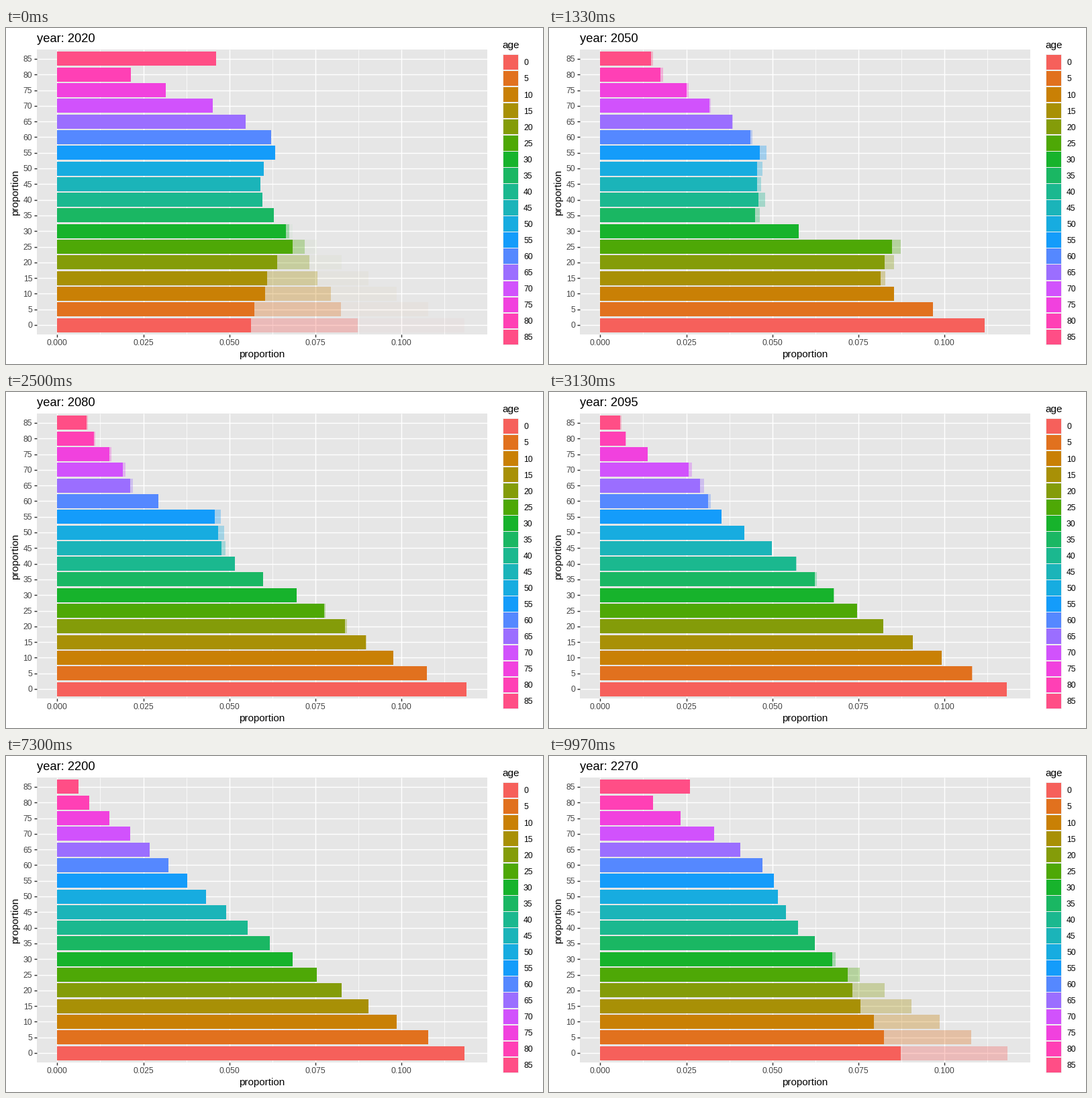
A matplotlib script that plays this animation: 800x500 px, repeating every 10 s.

```python
import numpy as np
import matplotlib.pyplot as plt
from matplotlib.animation import FuncAnimation
from matplotlib.collections import LineCollection, PolyCollection
from matplotlib.colors import to_rgb

plt.rcParams["font.family"] = "Liberation Sans"

FRAMES, STATES = 300, 51
LEFT, RIGHT, TOP, BOTTOM = 46, 717, 32, 456
X0, UNIT = 76.4, 5124          # pixel of zero, pixels per unit of proportion
ROW = (BOTTOM - TOP) / 18.2
AGES = range(0, 90, 5)
WAKE = [(1 / 3) ** 3, (2 / 3) ** 3]   # opacity two frames back, one frame back
COLORS = ["#f6605b", "#e1711e", "#c98005", "#a89006", "#849c09", "#4ea806",
          "#17b32c", "#1ab763", "#1bb88f", "#1bb4b9", "#17ace0", "#149cfa",
          "#5588ff", "#9b6eff", "#d152fc", "#f141de", "#ff40b5", "#ff4e86"]

# Bar ends in pixels for the first year and for the stable age structure
START = np.array([365, 370, 386, 389, 404, 427, 417, 399, 382,
                  379, 384, 401, 395, 357, 308, 238, 186, 313]) - X0
STABLE = np.array([683, 629, 582, 540, 500, 463, 427, 393, 360,
                   328, 298, 270, 242, 214, 184.6, 154, 124, 108]) - X0
GROWTH, OLDEST = 1.091, 0.31
BIRTHS = [0.0968, 0.298, 0.431, 0.371, 0.258, 0.131, 0.0585]   # ages 10 to 40


def leslie():
    """Projection matrix whose stable structure is STABLE."""
    m = np.zeros((18, 18))
    m[0, 2:9] = BIRTHS
    m[0] *= GROWTH * STABLE[0] / (m[0] @ STABLE)
    for i in range(16):
        m[i + 1, i] = GROWTH * STABLE[i + 1] / STABLE[i]
    m[17, 16] = (GROWTH - OLDEST) * STABLE[17] / STABLE[16]
    m[17, 17] = OLDEST
    return m


def project():
    m, pop, rows = leslie(), START / START.sum(), []
    for _ in range(STATES):
        rows.append(pop / pop.sum())
        pop = m @ pop
    return np.array(rows)


SHARES = project()
# The last few steps are one frame shorter
STARTS = np.array([3 + 6 * j - max(0, j - 46) for j in range(STATES)])


def state_at(k):
    return max(0, int(np.searchsorted(STARTS, k, side="right")) - 1)


def shares_at(k):
    k %= FRAMES
    if k < STARTS[0]:
        return SHARES[0]
    j = state_at(k)
    length = 3 if j < 46 else 2
    t = min(1, (k - STARTS[j] + 1) / length)
    return SHARES[j] * (1 - t) + SHARES[(j + 1) % STATES] * t


def box(x0, y0, x1, y1):
    return [(x0, y0), (x1, y0), (x1, y1), (x0, y1)]


def row_y(i):
    return BOTTOM - (0.6 + i) * ROW


def bars(k):
    h = 0.45 * ROW
    return [box(X0, row_y(i) - h, X0 + UNIT * v, row_y(i) + h)
            for back in (2, 1, 0)
            for i, v in enumerate(shares_at(k - back))]


fig = plt.figure(figsize=(8, 5), dpi=100, facecolor="white")
ax = fig.add_axes([0, 0, 1, 1])
ax.set_xlim(0, 800)
ax.set_ylim(500, 0)
ax.axis("off")


def polys(verts, colors, z):
    c = PolyCollection(verts, facecolors=colors, linewidths=0, zorder=z)
    ax.add_collection(c, autolim=False)
    return c


def lines(segs, color, width, z):
    ax.add_collection(LineCollection(segs, colors=color, linewidths=width * 0.72,
                                     capstyle="butt", zorder=z), autolim=False)


def label(x, y, s, size, color="black", **kw):
    return ax.text(x, y, s, size=size, color=color, va="baseline", **kw)


# Panel, grid and ticks
polys([box(LEFT, TOP, RIGHT, BOTTOM)], ["#e6e6e6"], 0)
major = [X0 + UNIT * 0.025 * i for i in range(5)]
minor = [x + UNIT * 0.0125 for x in major]
rows = [row_y(i) for i in range(18)]
lines([[(x, TOP), (x, BOTTOM)] for x in minor], "white", 0.74, 1)
lines([[(x, TOP), (x, BOTTOM)] for x in major]
      + [[(LEFT, y), (RIGHT, y)] for y in rows], "white", 1.48, 1)
lines([[(x, BOTTOM), (x, BOTTOM + 3.8)] for x in major]
      + [[(LEFT - 3.8, y), (LEFT, y)] for y in rows], "#333333", 1.48, 1)

for i, x in enumerate(major):
    label(x, 472, f"{0.025 * i:.3f}", 8.8, "#444444", ha="center")
for age, y in zip(AGES, rows):
    label(39.2, y + 4.4, str(age), 8.8, "#444444", ha="right")
label(381.3, 490, "proportion", 11, ha="center")
label(18, 244.5, "proportion", 11, ha="center", rotation=90,
      rotation_mode="anchor")
title = label(46, 21, "", 13.2)

# Legend
KEY = 24.05
label(739.3, 30, "age", 11)
polys([box(739.7, 39, 763.7, 39 + 18 * KEY)], ["#efefef"], 0)
polys([box(740.5, 39.8 + i * KEY, 762.9, 38.2 + (i + 1) * KEY)
       for i in range(18)], COLORS, 1)
for i, age in enumerate(AGES):
    label(771, 39 + (i + 0.5) * KEY + 4.4, str(age), 8.8)

fills = [(*to_rgb(c), a) for a in (*WAKE, 1) for c in COLORS]
bar_set = polys(bars(0), fills, 2)


def draw(k):
    bar_set.set_verts(bars(k))
    title.set_text(f"year: {2020 + 5 * state_at(k)}")
    return bar_set, title


anim = FuncAnimation(fig, draw, frames=FRAMES, interval=10000 / FRAMES,
                     init_func=lambda: draw(0), repeat=True, repeat_delay=0)
plt.show()
```
